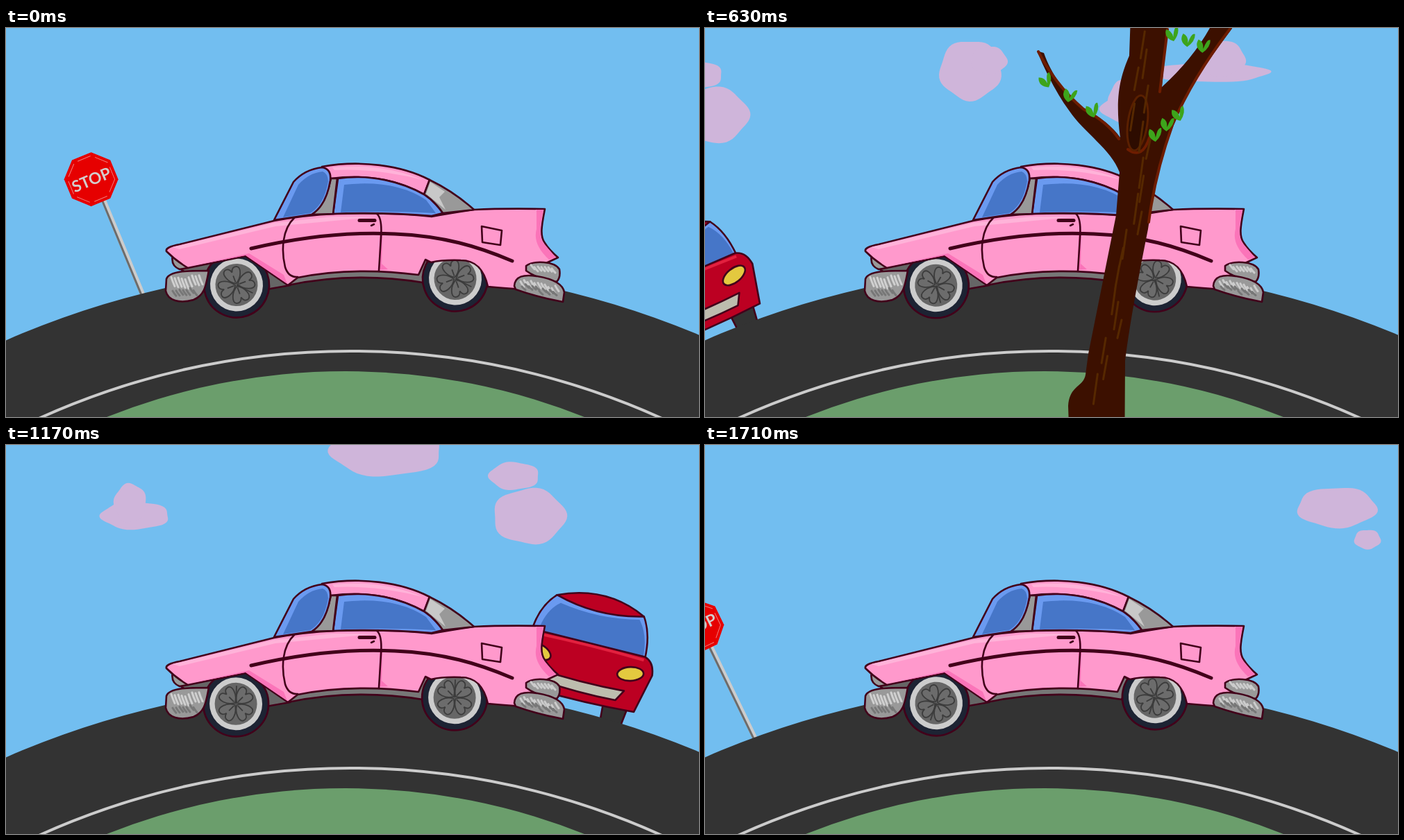
These frames come from a looping animation (998 px wide and 561 px high, 1.74 s). An HTML page with a canvas:

```html
<!DOCTYPE html>
<html>
<head>
<meta charset="utf-8">
<title>Pink car drive</title>
<style>
html, body { margin: 0; width: 100%; height: 100%; overflow: hidden; background: #72bef0; }
canvas, svg { position: absolute; left: 0; top: 0; width: 998px; height: 561px; }
.o { stroke: #42001a; stroke-width: 2.6; stroke-linejoin: round; stroke-linecap: round; }
.n { fill: none; }
.pink { fill: #ff99cc; }
.hot { fill: #fb74b9; }
.pale { fill: #ffb3d9; }
.glass { fill: #4676c8; }
.shine { fill: #6a9af0; }
.grey { fill: #999; }
.red { fill: #bc0022; }
.lamp { fill: #e3c93f; }
</style>
</head>
<body>
<canvas id="sky" width="998" height="561"></canvas>
<svg viewBox="0 0 998 561">
  <g id="sign">
    <path d="M0 14V-150" stroke="#ccc" stroke-width="7"/>
    <path d="M-2 14V-150" stroke="#6c6c6c" stroke-width="3"/>
    <g transform="translate(-5 -182)">
      <path id="plate" fill="#e60000"/>
      <path id="trim" class="n" stroke="#f07a7a" stroke-dasharray="20 7"/>
      <text y="9" text-anchor="middle" font-family="Lato, sans-serif" font-weight="700" font-size="23" fill="#d3cccc">STOP</text>
    </g>
  </g>

  <g id="redCar">
    <path class="o" fill="#333" d="M-78 50H-42V81H-74ZM40 50H76L72 81H42Z"/>
    <path class="o shine" d="M-62-82Q-83-60-85-24H83Q82-60 67-82Z"/>
    <path class="glass" d="M-54-72Q-72-58-76-26H80Q78-58 62-76Q5-62-54-72Z"/>
    <path class="o red" d="M-62-82Q5-112 67-82Q2-64-62-82Z"/>
    <path class="o red" d="M-85-26H82Q97-22 99-2L86 55Q0 61-85 56L-97-5Q-96-22-85-26Z"/>
    <path class="n" stroke="#e2213f" stroke-width="4" d="M-84-21Q0-24 82-21"/>
    <ellipse class="o lamp" cx="-68" cy="3" rx="19" ry="10" transform="rotate(16 -68 3)"/>
    <ellipse class="o lamp" cx="68" cy="3" rx="19" ry="10" transform="rotate(-16 68 3)"/>
    <path class="o" fill="#bdbcae" d="M-64 28Q0 33 65 29L56 45Q0 48-54 43Z"/>
  </g>

  <circle cx="508" cy="1610" r="1266" fill="#333"/>
  <circle cx="496" cy="1551" r="1085" class="n" stroke="#ccc" stroke-width="4"/>
  <circle cx="489" cy="1424" r="929" fill="#6b9e6c"/>

  <g id="car">
    <path class="o" fill="#666" d="M250 347L345 329 409 371 375 377 290 372Z"/>
    <path class="o" fill="#777" d="M406 371L420 358Q500 345 594 354L604 334 612 340 600 367Q500 351 406 371Z"/>
    <g id="front"></g>
    <g id="rear"></g>
    <path class="o grey" d="M240 328Q256 338 262 346L250 348Q237 343 240 328Z"/>
    <path class="o grey" d="M231 362C235 350 262 350 292 350C288 370 287 385 270 392C250 398 233 393 230 379Z"/>

    <path class="o pink" d="M231 322Q229 316 250 312L386 278Q430 270 475 268Q560 266 613 272Q640 267 674 262Q715 260 776 261C772 282 768 300 776 310Q782 320 795 331L765 345 745 377Q715 375 694 373C688 346 675 335 655 335Q630 334 612 338L604 334 594 356Q500 344 420 360L406 371 345 329 262 346Q245 336 231 322Z"/>
    <path class="hot" d="M764 262H774C770 282 767 300 774 310L792 331 782 334Q758 312 764 290ZM268 343L345 328 405 369 400 356 350 325ZM538 299H542L541 340 550 348 537 349Z"/>
    <path class="pale" d="M240 316L386 281 470 272H535L388 286 250 319Z"/>
    <path class="o n" d="M415 274C398 290 396 320 402 345Q407 360 420 359M537 350L540 302Q542 274 534 268"/>
    <path class="o n" style="stroke-width:5" d="M353 318C430 300 500 294 560 297C630 300 680 315 729 336M509 277.5H531"/>
    <path class="o n" d="M526 285L530 283M685 286L714 292 712 313 686 309Z"/>

    <path class="o pink" d="M455 200C510 190 570 198 610 219L602 240C570 222 525 210 468 217Z"/>
    <path class="pale" d="M470 201Q540 194 600 219Q535 202 473 205Z"/>
    <path class="o grey" d="M610 219Q645 236 674 262L629 267Q617 249 602 240Z"/>
    <path fill="#c8c8c8" d="M611 222L632 236 624 244 633 262 605 239Z"/>
    <path class="o shine" d="M471 268L478 217C525 210 570 222 602 240Q617 250 629 267L613 271Q540 265 471 268Z"/>
    <path class="glass" d="M482 266L487 226Q560 218 605 248L619 267Q540 263 482 266Z"/>
    <path class="o grey" d="M440 269Q460 255 468 217H477L471 268Z"/>
    <path class="o shine" d="M386 277L414 222Q430 204 455 201Q469 203 467 220C463 244 455 260 440 269Z"/>
    <path class="glass" d="M399 273L421 226Q436 209 456 207Q463 209 464 221C460 244 452 258 438 267Z"/>

    <path class="o grey" d="M749 343C760 335 790 336 797 348Q799 360 793 366Q765 362 749 350Z"/>
    <path class="o grey" d="M732 372C733 358 745 355 765 358Q801 364 804 381L802 395Q765 388 734 377Z"/>
    <g class="n" id="chrome" stroke-width="3" stroke-linecap="round"></g>
  </g>

  <g id="tree">
    <path fill="#3c1000" d="M523 545C525 515 545 518 548 500L552 470 592 270 597 208C585 175 545 150 525 120Q501 88 478 33L488 36C500 70 520 95 545 115Q582 135 598 158C590 100 598 70 611 40L616-110H676L658 85Q702 45 727 0L800-110H833L758 2C730 40 700 80 675 140C655 190 645 240 638 290Q612 420 605 480L604 660H527Z"/>
    <path class="n" stroke="#6e1d00" stroke-width="4" stroke-linecap="round" d="M480 34Q506 84 545 117Q580 136 596 160M666 2L655 92M757 0Q702 72 673 140Q648 210 639 280M609 175Q630 190 640 158"/>
    <ellipse cx="623" cy="137" rx="14" ry="40" transform="rotate(8 623 137)" fill="#2d0c00" stroke="#5a2000" stroke-width="3"/>
    <path id="bark" class="n" stroke="#562800" stroke-width="3" stroke-linecap="round"/>
    <g id="leaves" fill="#3da41b"></g>
  </g>
</svg>
<script>
const STEP = 30, LOOP = 1740;
const $ = id => document.getElementById(id);
const rad = a => a * Math.PI / 180;
const mix = (a, b, u) => a + (b - a) * u;
let seed = 7;
const random = () => (seed = seed * 16807 % 2147483647) / 2147483647;

// Smooth curve through [time, value] points, straight beyond both ends.
function curve(t, ...points) {
  const last = points.length - 1;
  const slope = k => (points[k + 1][1] - points[k][1]) / (points[k + 1][0] - points[k][0]);
  const tangent = k => (slope(Math.max(k - 1, 0)) + slope(Math.min(k, last - 1))) / 2;
  const end = t <= points[0][0] ? 0 : t >= points[last][0] ? last : -1;
  if (end >= 0) return points[end][1] + tangent(end) * (t - points[end][0]);
  const k = points.findIndex(p => p[0] > t) - 1;
  const [t0, a] = points[k], [t1, b] = points[k + 1];
  const h = t1 - t0, u = (t - t0) / h, v = 1 - u;
  return mix(a, b, u * u * (3 - 2 * u)) + h * u * v * (tangent(k) * v - tangent(k + 1) * u);
}

// A cloud follows a shallow arch with its top at (topX, topY); puffs are dx, dy, rx, ry.
const clouds = [
  { x: 323, pace: 1, topX: 640, topY: 47, puffs: [[0, 16, 84, 14], [12, -4, 38, 26]] },
  { x: 214, pace: 1, topX: 620, topY: 108, puffs: [[0, 8, 49, 22], [-14, -4, 24, 29]] },
  { x: -14, pace: 0.99, topX: 300, topY: 60, puffs: [[-5, 0, 44, 43], [22, -14, 26, 20]] },
  { x: -382, pace: 0.97, topX: 505, topY: 95, puffs: [[0, 0, 52, 40], [-22, -58, 36, 20]] },
  { x: -729, pace: 1.09, topX: 312, topY: 2, puffs: [[0, 0, 80, 36]] },
  { x: -985, pace: 1, topX: 505, topY: 77, puffs: [[0, 12, 49, 20], [-7, -6, 23, 28]] },
  { x: -1340, pace: 1, topX: 639, topY: 81, puffs: [[0, 0, 57, 29], [44, 46, 19, 14]] }
];
const pen = $("sky").getContext("2d");

function puff(x, y, rx, ry) {
  pen.beginPath();
  for (let a = 0; a < 6.28; a += 0.1) {
    const r = 1 + 0.05 * Math.sin(5 * a + rx);
    pen.lineTo(x + rx * r * Math.cos(a), y + ry * r * Math.sin(a));
  }
  pen.fill();
}

function drawSky(t) {
  pen.fillStyle = "#72bef0";
  pen.fillRect(0, 0, 998, 561);
  pen.fillStyle = "#cfb5da";
  const drift = curve(t, [390, 0], [630, 405], [780, 625], [990, 868], [1320, 1455], [1710, 2250]);
  for (const c of clouds) {
    const x = c.x + c.pace * drift, y = c.topY + (x - c.topX) ** 2 / 8000;
    for (const [dx, dy, rx, ry] of c.puffs) puff(x + dx, y + dy, rx, ry);
  }
}

function octagon(r) {
  let d = "";
  for (let a = 22.5; a < 360; a += 45) d += `${d ? "L" : "M"}${r * Math.cos(rad(a))} ${r * Math.sin(rad(a))}`;
  return d + "Z";
}
$("plate").setAttribute("d", octagon(39));
$("trim").setAttribute("d", octagon(34));

// Leaves grow along three twigs.
for (const [x0, y0, x1, y1] of [[492, 77, 559, 120], [683, 125, 649, 155], [674, 10, 718, 27]])
  for (const u of [0, 0.5, 1])
    $("leaves").innerHTML += `<path transform="translate(${mix(x0, x1, u)} ${mix(y0, y1, u)}) rotate(${40 * random() - 20})"
      d="M0 9Q-14 3-9-9Q-1-7 0 3Q3-13 8-11Q10-1 0 9Z"/>`;

let bark = "";
for (let y = 5; y < 520; y += 26) {
  const x = 632 - Math.max(0, y - 180) * 0.18 + 30 * random() - 15;
  bark += `M${x} ${y}l-6 ${25 + 20 * random()}`;
}
$("bark").setAttribute("d", bark);

// Short slanted strokes in a band from (x, y), w wide, falling by drop.
function hatch(x, y, w, drop, len, color) {
  let d = "";
  for (let u = 0; u <= 1; u += 5 / w) d += `M${x + w * u} ${y + drop * u + 6 * random() - 3}q2 ${len / 2} 5 ${len}`;
  $("chrome").innerHTML += `<path d="${d}" stroke="${color}"/>`;
}
hatch(238, 362, 40, -4, 13, "#d0d0d0");
hatch(240, 380, 30, -4, 7, "#777");
hatch(756, 342, 32, 4, 6, "#ccc");
hatch(741, 363, 50, 11, 8, "#ccc");
hatch(743, 371, 46, 10, 5, "#777");

const petal = a => `<path transform="rotate(${a})" d="M0-2C-11-8-15-22-9-25Q-2-27 0-19Q2-27 9-25C15-22 11-8 0-2ZM0-4V-14"/>`;
const wheel = `<circle class="o" r="47" fill="#1d2333"/><circle r="38" fill="#ccc"/><circle r="30.5" fill="#666"/>
  <g fill="#6c6c6c" stroke="#3c3c3c" stroke-width="1.8">${[0, 90, 180, 270].map(petal).join("")}<path d="M0 0L18 19"/></g>`;
$("front").innerHTML = $("rear").innerHTML = wheel;

function place(id, x, y, turn) {
  $(id).setAttribute("transform", `translate(${x} ${y}) rotate(${turn})`);
}
function onHill(id, radius, angle, turn) {
  place(id, 510 + radius * Math.sin(rad(angle)), 1610 - radius * Math.cos(rad(angle)), turn);
}

function draw(t) {
  drawSky(t);

  // The scene skips one step where it loops.
  const s = t > 1500 ? t - LOOP - STEP : t;
  onHill("sign", 1265, curve(s, [-60, -20.25], [0, -14.33], [390, 20.25]),
    curve(s, [-60, -25.8], [0, -22.5], [390, 28]));

  const red = curve(t, [630, -23.4], [780, -16.9], [990, 2.2], [1320, 21.2], [1620, 27.5]);
  onHill("redCar", 1339, red, red);

  const u = t - 630, sway = Math.min(90, 0.181 * u + 0.00012 * u * u);
  $("tree").setAttribute("transform", `rotate(${sway} 452 1097)`);

  // Wheels spin slightly off centre.
  const spin = t / 220 * 360, dx = -Math.sin(rad(spin)), dy = -2 * Math.cos(rad(spin));
  place("front", 332 + dx, 372.5 + dy, -spin - 20);
  place("rear", 647 + dx, 363.5 + dy, -spin - 20);
}

const start = performance.now();
function tick() {
  const t = (performance.now() - start) % LOOP;
  draw(Math.floor(t / STEP) * STEP);
  requestAnimationFrame(tick);
}
tick();
</script>
</body>
</html>
```
